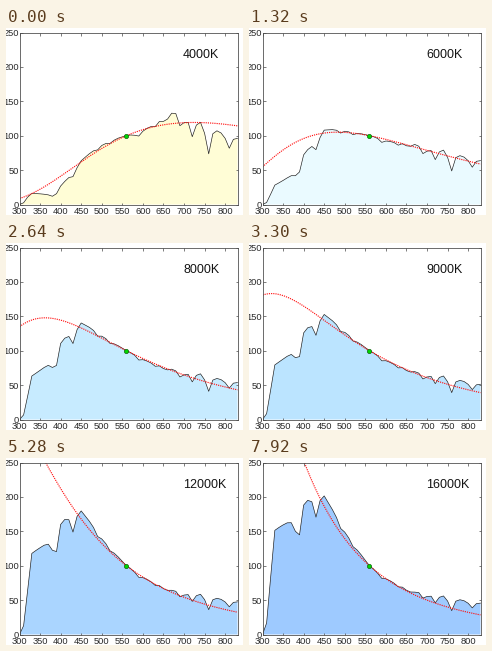
These frames come from a looping animation (237x187 px, 8 s). A matplotlib script:

```python
import numpy as np
import matplotlib.pyplot as plt
from matplotlib.animation import FuncAnimation

W, H = 237, 187
LEFT, RIGHT, TOP, BOTTOM = 13.5, 231.5, 4.5, 176.5
LOOP_MS, STEP_MS, TICK_MS = 8000, 330, 20
GREY = "#4a4a4a"

plt.rcParams["font.family"] = "Liberation Sans"

NM = np.arange(300, 831, 10)
FINE = np.linspace(300, 830, 160)


def through(points, x=NM):
    """Piecewise linear curve through a few (x, value) points."""
    px, py = zip(*points)
    return np.interp(x, px, py)


# mean daylight: an envelope minus narrow absorption bands (centre, depth)
BANDS = [(380, 4), (430, 18), (490, 5), (520, 4), (590, 5), (630, 4),
         (655, 5), (693, 12), (720, 16), (759, 26), (809, 12)]
S0 = through([(300, 0), (310, 6), (330, 55), (370, 68), (390, 68), (400, 95),
              (420, 110), (450, 126), (480, 121), (560, 100), (610, 90),
              (670, 85), (740, 77), (790, 67), (830, 62)])
for centre, depth in BANDS:
    S0 -= depth * np.exp(-((NM - centre) / 6)**2 / 2)

# blue-yellow and pink-green variation as smooth shares of the mean
S1 = S0 * through([(330, .76), (380, .61), (400, .458), (450, .286),
                   (500, .143), (560, 0), (670, -.165), (830, -.16)])
S2 = S0 * through([(310, .2), (350, .108), (400, -.01), (450, -.023),
                   (560, 0), (580, .006), (680, .124), (720, .11)])

# fill colour by mired (1e6 / kelvin)
TINTS = [(62.5, (158, 202, 255)), (111, (187, 228, 255)),
         (143, (214, 245, 255)), (182, (247, 254, 255)),
         (200, (255, 254, 244)), (250, (255, 253, 214))]


def daylight(t):
    """Relative power of the CIE D illuminant at t kelvin."""
    if t <= 7000:
        x = -4.6070e9 / t**3 + 2.9678e6 / t**2 + 99.11 / t + 0.244063
    else:
        x = -2.0064e9 / t**3 + 1.9018e6 / t**2 + 247.48 / t + 0.237040
    y = -3 * x * x + 2.87 * x - 0.275
    m = 0.0241 + 0.2562 * x - 0.7341 * y
    m1 = (-1.3515 - 1.7703 * x + 5.9114 * y) / m
    m2 = (0.03 - 31.4424 * x + 30.0717 * y) / m
    return S0 + m1 * S1 + m2 * S2


def planck(nm, t):
    return nm**-5.0 / np.expm1(1.4388e7 / (nm * t))


def blackbody(t):
    return 100 * planck(FINE, t) / planck(560.0, t)


def tint(t):
    return [through([(m, rgb[c] / 255) for m, rgb in TINTS], 1e6 / t)
            for c in range(3)]


fig = plt.figure(figsize=(W / 72, H / 72), dpi=72, facecolor="white")
ax = fig.add_axes([LEFT / W, 1 - BOTTOM / H,
                   (RIGHT - LEFT) / W, (BOTTOM - TOP) / H])
ax.set(xlim=(300, 830), ylim=(0, 250),
       xticks=range(300, 801, 50), yticks=range(0, 251, 50))
ax.set_axisbelow(False)
ax.tick_params(direction="in", top=True, right=True, length=2.5, width=0.7,
               labelsize=9.3, color=GREY, labelcolor="#2a2a2a")
ax.tick_params(axis="x", pad=2)
ax.tick_params(axis="y", pad=0.8)
for spine in ax.spines.values():
    spine.set(linewidth=0.8, color=GREY)

area, = ax.fill([300, 830, 830], [0, 0, 1], lw=0, zorder=1)
edge, = ax.plot([], [], color="#1c1c1c", lw=0.65, zorder=1.5)
glow, = ax.plot([], [], color="#ff1010", lw=1.15, ls=(0, (1, 0.9)), zorder=2)
ax.plot(560, 100, "o", ms=4.2, mfc="#00d800", mec="#106010", mew=0.7, zorder=3)
label = fig.text(177 / W, 1 - 30 / H, "", size=12.5, color="#141414")


def update(i):
    t = 4000 + 500 * ((i * TICK_MS + TICK_MS // 2) // STEP_MS)
    power = daylight(t)
    edge.set_data(NM, power)
    area.set_xy([(300, 0), *zip(NM, power), (830, 0)])
    area.set_facecolor(tint(t))
    glow.set_data(FINE, blackbody(t))
    label.set_text(f"{t}K")
    return area, edge, glow, label


anim = FuncAnimation(fig, update, frames=LOOP_MS // TICK_MS,
                     interval=TICK_MS, repeat=True, repeat_delay=0)
plt.show()
```
